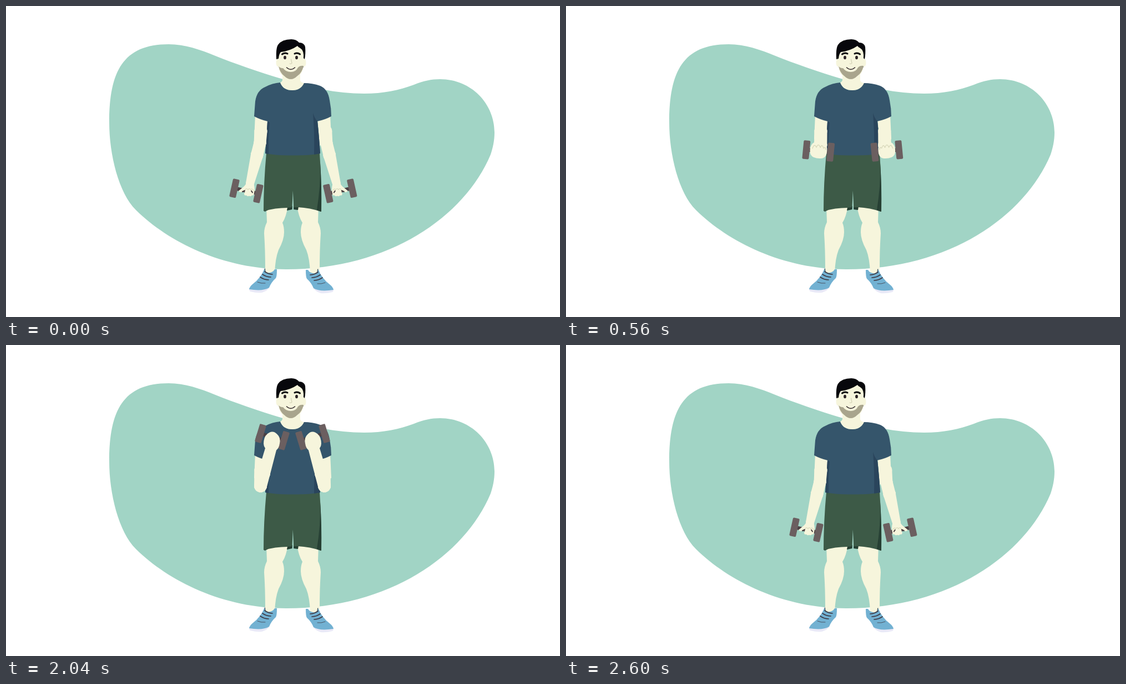
Write an HTML page with a canvas that moves like this. It is 998 px wide and 561 px high and loops after 2.84 s.

```html
<!DOCTYPE html>
<html lang="en">
<head>
<meta charset="utf-8">
<title>Biceps curl</title>
<style>
html, body { margin: 0; width: 100%; height: 100%; overflow: hidden; background: #fff; }
canvas { display: block; width: 998px; height: 561px; }
</style>
</head>
<body>
<canvas id="stage"></canvas>
<script>
const W = 998, H = 561, LOOP = 2840, TICK = 40, STEPS = 15;
const canvas = document.getElementById('stage');
const ctx = canvas.getContext('2d');
const dpr = window.devicePixelRatio || 1;
canvas.width = W * dpr;
canvas.height = H * dpr;

const SKIN = '#f6f5dc', BLOB = '#a1d4c5', SHIRT = '#35556b', SHADE = '#2a455c',
  SHORTS = '#3d5a47', SHORTS_DARK = '#263f33', HAIR = '#07070c', BEARD = '#a9a58d',
  PLATE = '#6b5f60', BAR = '#4b4144', SHOE = '#72b1d2', SOLE = '#e9e9f7',
  LACE = '#3f3a44', CREASE = '#d8d8ba', EYE = '#2b2226';

function fill(d, color) {
  ctx.fillStyle = color;
  ctx.fill(new Path2D(d));
}

function line(d, color, width) {
  ctx.strokeStyle = color;
  ctx.lineWidth = width;
  ctx.lineCap = 'round';
  ctx.lineJoin = 'round';
  ctx.stroke(new Path2D(d));
}

function ellipse(x, y, rx, ry, color) {
  ctx.fillStyle = color;
  ctx.beginPath();
  ctx.ellipse(x, y, rx, ry, 0, 0, 7);
  ctx.fill();
}

function box(x, y, w, h, r, color) {
  ctx.fillStyle = color;
  ctx.beginPath();
  ctx.roundRect(x - w / 2, y - h / 2, w, h, r);
  ctx.fill();
}

// Runs draw twice: as is, and flipped about a vertical axis.
function pair(axis, draw, dy = 0) {
  draw();
  ctx.save();
  ctx.translate(2 * axis, dy);
  ctx.scale(-1, 1);
  draw();
  ctx.restore();
}

// Arm poses: step, dumbbell x y tilt, elbow x y r, wrist x y r, hand x y halfW halfH, creases
const POSES = [
  [0, 433, 333.5, 12.5, 457.5, 247, 11, 439.5, 320, 7.5, 437, 331, 11, 11, 0],
  [1, 433.2, 331.5, 12.2, 457.5, 247.2, 11, 439.7, 318, 7.6, 437, 329, 11.2, 11, 0],
  [5, 438, 296, 6, 457.5, 253, 11, 446, 281, 10, 438, 288, 14.5, 12.5, 1],
  [9, 462.5, 248.5, 5.5, 459, 250, 12, 463, 250, 12, 463, 247, 15.5, 16.5, 1],
  [11, 482.5, 218.5, 6, 459.5, 253, 12.5, 483, 212, 11.5, 482, 211, 15, 13, 1],
  [14, 479.5, 166, 17, 458.5, 254, 11.5, 478.7, 182, 10, 479, 173.5, 14.5, 17.5, 0],
  [15, 480, 162.5, 17.5, 458.5, 254, 11.5, 478.7, 180, 10, 479, 171.5, 14.5, 18, 0]
];

function slope(i, k) {
  if (i === 0 || i === POSES.length - 1) return 0;
  const a = POSES[i - 1], b = POSES[i], c = POSES[i + 1];
  const left = (b[k] - a[k]) / (b[0] - a[0]);
  const right = (c[k] - b[k]) / (c[0] - b[0]);
  return left * right > 0 ? 2 * left * right / (left + right) : 0;
}

function poseAt(s) {
  let i = 0;
  while (i < POSES.length - 2 && POSES[i + 1][0] <= s) i++;
  const a = POSES[i], b = POSES[i + 1], h = b[0] - a[0];
  const u = (s - a[0]) / h, v = 1 - u;
  return a.map((p, k) =>
    p * (1 + 2 * u) * v * v + b[k] * u * u * (3 - 2 * u) +
    h * u * v * (slope(i, k) * v - slope(i + 1, k) * u));
}

// Hull of two circles
function limb(x1, y1, r1, x2, y2, r2) {
  ellipse(x1, y1, r1, r1, SKIN);
  ellipse(x2, y2, r2, r2, SKIN);
  const d = Math.hypot(x2 - x1, y2 - y1);
  if (d <= Math.abs(r1 - r2)) return;
  const dir = Math.atan2(y2 - y1, x2 - x1), open = Math.acos((r1 - r2) / d);
  ctx.beginPath();
  ctx.arc(x1, y1, r1, dir + open, dir - open + 2 * Math.PI);
  ctx.arc(x2, y2, r2, dir - open, dir + open);
  ctx.fill();
}

function dumbbell(x, y, tilt) {
  ctx.save();
  ctx.translate(x, y);
  ctx.rotate(tilt * Math.PI / 180);
  box(0, 0, 34, 6.5, 1, BAR);
  box(-22, 0, 12, 33.5, 2, PLATE);
  box(22, 0, 12, 33.5, 2, PLATE);
  ctx.restore();
}

function hangingHand(x, y) {
  ctx.save();
  ctx.translate(x, y);
  fill('M1 -16 Q-2 -9 -8 -5 L-14 0 Q-13 3 -8 2 L-3 -1 Q-2 2 -4 5 Q-4 9 0 8 Q2 11 5 9 Q8 11 10 8 Q14 9 14 4 L15 -1 Q15 -7 13 -15Z', SKIN);
  line('M-7 1.5 L-3 -.5 M9 0 L11 3', BAR, 2);
  line('M-2 -2 Q0 -6 3 -2 Q5 -6 8 -2 Q10 -5 13 -1', CREASE, 1.2);
  ctx.restore();
}

function fist(x, y, w, h, tilt, creases) {
  ctx.save();
  ctx.translate(x, y);
  ctx.rotate(tilt * Math.PI / 360);
  fill(`M${-w} ${h * .1} Q${-w} ${-h * .55} ${-w * .45} ${-h * .85} Q0 ${-h * 1.12} ${w * .5} ${-h * .8}
    Q${w * 1.05} ${-h * .5} ${w} ${h * .1} Q${w * 1.02} ${h * .75} ${w * .55} ${h * .95}
    Q0 ${h * 1.08} ${-w * .55} ${h * .9} Q${-w} ${h * .7} ${-w} ${h * .1}Z`, SKIN);
  ctx.globalAlpha = Math.max(0, Math.min(1, creases));
  const top = -h * .35;
  line(`M-11 ${top + 4} Q-8 ${top - 6} -4 ${top + 2} Q-1 ${top - 7} 3 ${top + 2}
    Q6 ${top - 6} 9 ${top + 3} Q12 ${top - 1} 13 ${top + 5}`, CREASE, 1.3);
  ctx.restore();
}

function forearm(s) {
  const [, dx, dy, tilt, ex, ey, er, wx, wy, wr, hx, hy, hw, hh, creases] = poseAt(s);
  const mx = ex + (wx - ex) * .3, my = ey + (wy - ey) * .3;
  const mr = er + (wr - er) * .3 + (s < 5 ? 1.2 * (1 - s / 5) : 0);
  limb(459, 226, 11.5, ex, ey, er);
  limb(ex, ey, er, mx, my, mr);
  limb(mx, my, mr, wx, wy, wr);
  dumbbell(dx, dy, tilt);
  if (s < 3) hangingHand(dx, dy);
  else fist(hx, hy, hw, hh, tilt, creases);
}

function background() {
  ctx.fillStyle = '#fff';
  ctx.fillRect(0, 0, W, H);
  fill('M186 210 C186 118 211 69 293 69 C323 69 350 79 376 89.5 C412 104 455 119 497 131.5 ' +
    'C545 147 595 158 645 158 C680 158 708 152 735 142 C752 135 766 132 782 132 ' +
    'C838 132 880 176 880 228 C880 243 877 256 873 268 C826 380 690 475 505 475 ' +
    'C391 475 293 426 234 368 C203 337 186 268 186 210Z', BLOB);
}

function legs() {
  pair(516, () => fill('M469 360 L470 390 Q465 400 465 410 Q467 440 467 476 L470 484 L484 482 ' +
    'Q485 455 491 440 Q501 422 501 408 Q501 398 498 391 Q505 380 508 360Z', SKIN));
  pair(514, () => {
    fill('M439 508 Q437 513 440 515 Q452 518 461 517 Q471 514 475 507Z', SOLE);
    fill('M466 473 Q467 480 471 481 Q480 482 484 475 L488 475 Q488 488 486 491 ' +
      'Q478 498 474 508 Q463 515 438 511 Q439 506 444 502 Q459 491 466 473Z', SHOE);
    line('M466 479 Q473 484 480 484 M462 484 Q469 489 477 489 M458 489 Q465 494 473 494', LACE, 1.7);
    line('M453 498 Q460 501 467 500', LACE, .8);
    line('M466.5 474 L467 480', LACE, 1);
  }, 1);
}

function shorts() {
  fill('M506 369 L507 363 L516 361 L515.5 367Z M518.2 367 L518 361 L527 362 L526 368Z ' +
    'M464 367 L472 368 L466 371Z', SHORTS_DARK);
  fill('M469 265 Q464 320 464 370 Q485 364 507 364 L515.5 363 L516.8 333 L518.2 363 ' +
    'L526 363 Q548 364 567 371 Q569 320 565 265Z', SHORTS);
  fill('M566 284 Q567 325 560 368 L568 371 Q569 325 566 284Z', SHORTS_DARK);
}

function torso() {
  pair(516.5, () => fill('M449 196 L472 200 L468 252 L447 240Z', SKIN));
  fill('M494 138 Q480 139 467 146 Q452 152 449 172 Q448 185 447 199 Q458 205 471 208 ' +
    'Q469 240 467 266 Q490 270 516 269.5 Q545 270 566 266 Q564 235 561 208 Q575 205 586 199 ' +
    'Q586 185 583 170 Q580 150 566 144 Q552 139 536 139 Q530 152 516 152 Q499 152 494 138Z', SHIRT);
  fill('M553 193 Q556 203 561 208 Q564 235 566 266 L555 268 Q556 230 553 193Z', SHADE);
  fill('M471 208 L475 210 Q472 240 473 267 L467 266 Q469 240 471 208Z', SHADE);
}

function head() {
  fill('M498 116 L498 134 Q497 137 494 138 Q499 152 516 152 Q531 152 537 139 Q531 138 530 134 L530 116Z', SKIN);
  fill('M490 106 L495 108 L495 115Z M531 106 L537 107 L534 114Z', HAIR);
  ellipse(490, 102, 3.5, 7.5, SKIN);
  ellipse(537, 102, 3.5, 7.5, SKIN);
  fill('M490 80 L491 107 Q493 131 513 131 Q533 131 536 107 L537 78 Q513 64 490 80Z', SKIN);
  fill('M491 109 Q495 113 499 112 Q504 119 513 119 Q522 119 526 111 Q530 107 536 108 ' +
    'Q533 121 525 126 Q513 138 501 126 Q494 121 491 109Z', BEARD);
  fill('M487 96 Q486 76 490 70 Q497 60 514 60 Q523 60 528 66 Q537 66 539 74 Q540 86 538 96 ' +
    'L536 94 Q537 80 530 76 Q526 74 525 72 Q512 81 495 83 Q492 86 491 95Z', HAIR);
  line('M497.5 87 Q502 83.5 507 86 M520 86 Q525 83.5 529.5 87', HAIR, 3);
  ellipse(502.5, 93, 2.4, 3.3, EYE);
  ellipse(523.5, 93, 2.4, 3.3, EYE);
  line('M513.5 96 L515 103 Q514 105 511 104', '#d3d2b6', 1.2);
  line('M505.5 111 Q513 118 520.5 111', EYE, 1.5);
}

function stepAt(t) {
  const n = Math.floor(t / TICK);
  const ramp = start => Math.max(0, Math.min(STEPS, n - start));
  return ramp(6) - ramp(50);
}

function render(now) {
  const s = stepAt(now % LOOP);
  ctx.setTransform(dpr, 0, 0, dpr, 0, 0);
  background();
  legs();
  shorts();
  torso();
  head();
  pair(516 + 1.4 * Math.max(0, Math.min(1, (9 - s) / 4)), () => forearm(s));
}

const start = performance.now();
function loop() {
  render(performance.now() - start);
  requestAnimationFrame(loop);
}
loop();
</script>
</body>
</html>
```
